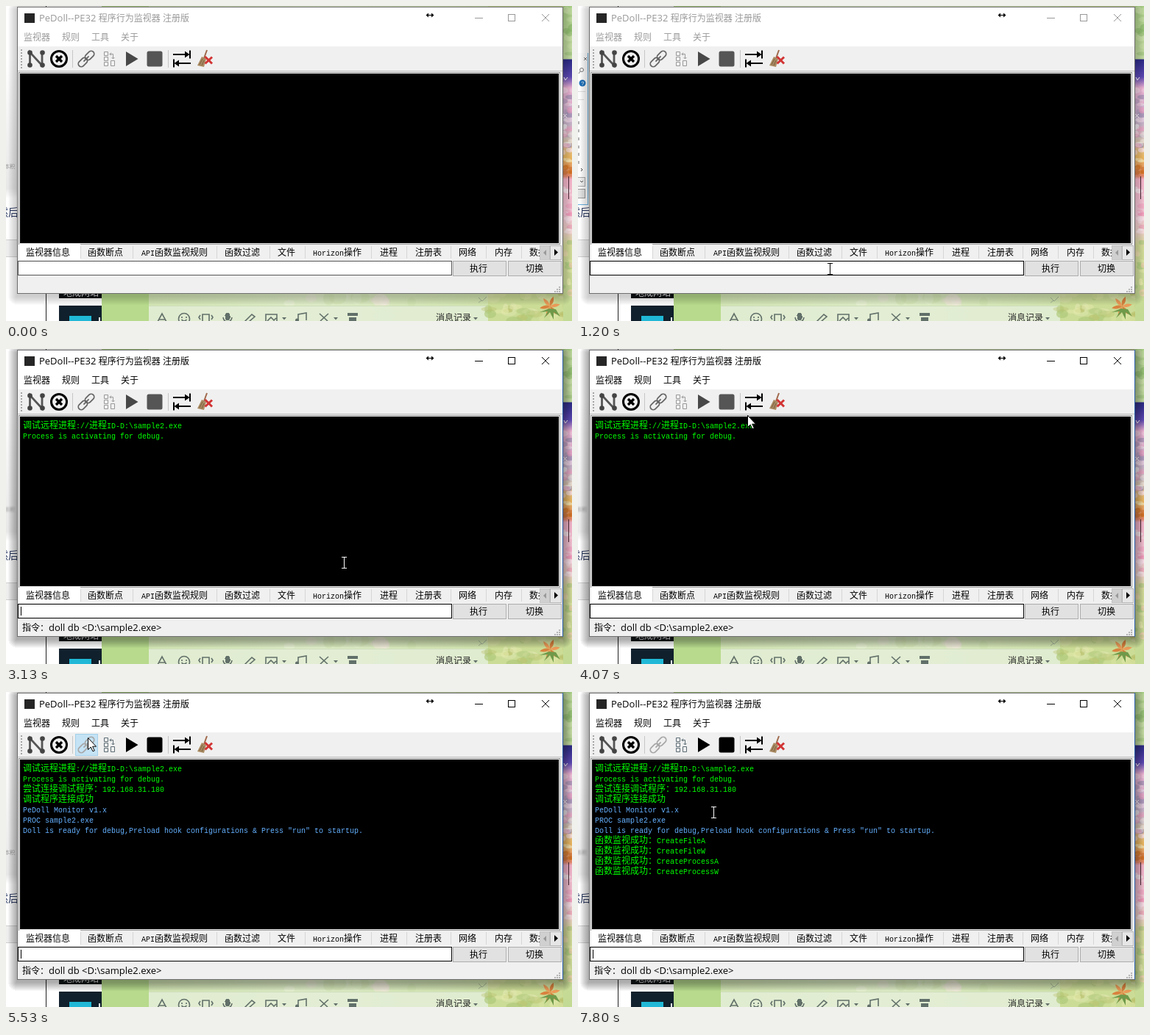
Write an HTML page that moves like this. It is 769x429 px and loops after 8 s.

```html
<!DOCTYPE html>
<html lang="zh">
<head>
<meta charset="utf-8">
<title>Monitor</title>
<style>
html, body { margin: 0; width: 100%; height: 100%; overflow: hidden; background: #fff; }
svg { display: block; width: 769px; height: 429px; }
text { font: 12px "Noto Sans CJK SC", "Noto Sans CJK", sans-serif; white-space: pre; }
.mono { font: 10px "Liberation Mono", monospace; }
.ui { font: 13px "Open Sans", "Noto Sans", sans-serif; }
rect, .crisp { shape-rendering: crispEdges; }
.beam { mix-blend-mode: difference; }
</style>
</head>
<body>
<svg id="stage" width="769" height="429" viewBox="0 0 769 429">
  <defs>
    <linearGradient id="strip" x2="0" y2="1">
      <stop offset="0" stop-color="#a9cf86"/><stop offset=".168" stop-color="#c3dba2"/>
      <stop offset=".17" stop-color="#2b2a86"/><stop offset=".225" stop-color="#5d49b4"/>
      <stop offset=".26" stop-color="#eeb4d4"/><stop offset=".36" stop-color="#c6b0cf"/>
      <stop offset=".42" stop-color="#d9c8c0"/><stop offset=".48" stop-color="#eebb62"/>
      <stop offset=".54" stop-color="#e98a6a"/><stop offset=".55" stop-color="#f6b5cb"/>
      <stop offset=".66" stop-color="#f5c9d8"/><stop offset=".72" stop-color="#ecd0c4"/>
      <stop offset=".76" stop-color="#d5dd9a"/><stop offset="1" stop-color="#c2da94"/>
    </linearGradient>
    <linearGradient id="chat"><stop stop-color="#d3e6b4"/><stop offset=".5" stop-color="#dfedc8"/><stop offset="1" stop-color="#d2e5ae"/></linearGradient>
    <linearGradient id="fade" x2="0" y2="1"><stop stop-color="#fff"/><stop offset=".93" stop-color="#e8e8e8"/><stop offset="1" stop-color="#fff"/></linearGradient>
  </defs>
  <g id="back"></g>
  <g id="panel"></g>
  <g id="shadow"></g>
  <g id="win"></g>
  <g id="tools" fill="none">
    <g stroke="#555" stroke-width="2.800"><path d="M32.500 81V63L49 81V63"/>
      <g fill="#444" stroke="none"><circle cx="32.500" cy="63.500" r="3.300"/><circle cx="32.500" cy="80.500" r="3.300"/><circle cx="49.500" cy="63.500" r="3.300"/><circle cx="49.500" cy="80.500" r="3.300"/></g></g>
    <g stroke="#000" stroke-width="3"><circle cx="72" cy="72" r="10.500"/><path d="M68 68l8 8m0-8l-8 8" stroke-width="3.400"/></g>
    <g id="link" stroke-width="1.800" transform="rotate(-45 109 72)"><rect x="95.500" y="68" width="14" height="8" rx="4" style="shape-rendering:auto"/><rect x="108.500" y="68" width="14" height="8" rx="4" style="shape-rendering:auto"/><path d="M104 72h10"/></g>
    <path id="tree" d="M133.500 62.500h5v5h-5zM133.500 69.500h5v5h-5zM133.500 76.500h5v5h-5zM142.500 74.500h5v7h-5zM141 65.500h4.500v6M143.500 70l2 2 2-2M143 63.500l-2 2 2 2"/>
    <path id="play" d="M163 62L179.500 72 163 82Z"/>
    <rect id="stop" x="191.500" y="61.500" width="21" height="21" rx="2.500" style="shape-rendering:auto"/>
    <g stroke="#000" stroke-width="2"><path d="M227 66h18M250 60.500v11M251 78h-18M228 72.500v11"/><path d="M243 61.500l6.500 4.500-6.500 4.500zM235 73.500l-6.500 4.500 6.500 4.500z" fill="#000" stroke="none"/></g>
    <path d="M273 60l-4 11" stroke="#a06a4c" stroke-width="2"/>
    <path d="M266 69l6 3-3 11-9-2z" fill="#a98a62"/><path d="M263 80l4-8m-1 9l3-7" stroke="#7a603f"/>
    <path d="M270.500 69l9.500 9.500m0-9l-9.500 9" stroke="#d23434" stroke-width="3"/>
  </g>
  <g id="log"></g>
  <g id="live"></g>
  <g id="arrow"><path d="M.5 .5V16.500L4.200 13 7 18.800 9.300 17.800 6.600 12.200H11.500Z" fill="#fff" stroke="#000"/></g>
  <g id="beam" class="beam"><path class="crisp" fill="#fff" d="M-3 -8h7v1h-7zM0 -7h1v14h-1zM-3 7h7v1h-7z"/></g>
</svg>
<script>
const $ = id => document.getElementById(id);
const LOOP = 8000;

function add(parent, tag, attrs) {
  const e = document.createElementNS('http://www.w3.org/2000/svg', tag);
  for (const k in attrs) e.setAttribute(k, attrs[k]);
  return parent.appendChild(e);
}
const box = (p, x, y, width, height, fill, more) => add(p, 'rect', { x, y, width, height, fill, ...more });
const line = (p, d, stroke, more) => add(p, 'path', { d, stroke, fill: 'none', ...more });
const frame = (p, x, y, w, h, fill, stroke) => box(p, x + .5, y + .5, w - 1, h - 1, fill, { stroke });

// Latin runs get their own face, the rest stays in the CJK face
function label(p, x, y, str, fill, latin = 'mono') {
  const t = add(p, 'text', { x, y, fill });
  for (const run of str.match(/[\x00-\x7f]+|[^\x00-\x7f]+/g))
    add(t, 'tspan', run.charCodeAt(0) < 128 ? { class: latin } : {}).textContent = run;
  return t;
}

let seed = 7;
const rnd = () => (seed = seed * 16807 % 2147483647) / 2147483647;
function blobs(p, n, x, y, w, h, r, colors) {
  for (let i = 0; i < n; i++)
    add(p, 'ellipse', {
      cx: x + rnd() * w, cy: y + rnd() * h, rx: r * (.4 + rnd()), ry: r * (.3 + rnd() * .6),
      fill: colors[i % colors.length], opacity: .3 + rnd() * .4
    });
}

function drawBack() {
  const g = $('back');
  box(g, 0, 0, 769, 429, '#fff');
  box(g, 130, 0, 64, 429, '#b7da8c');
  box(g, 194, 0, 461, 429, 'url(#chat)');
  blobs(g, 12, 385, 392, 180, 14, 11, ['#eaf2d8', '#cfe3ae', '#efe9da']);
  box(g, 194, 408, 461, 21, '#e4eed8', { opacity: .8 });
  line(g, 'M194 408.500H655', '#cddcb8');
  box(g, 655, 0, 114, 429, '#cbdc96');
  blobs(g, 40, 655, 388, 114, 41, 8, ['#dfe6a6', '#adc878', '#e4e8b4', '#b9bf6a']);
  box(g, 757, 0, 12, 429, 'url(#strip)');
  blobs(g, 9, 757, 0, 12, 68, 6, ['#cfe3ae', '#8dbb6c']);
  blobs(g, 30, 757, 115, 12, 85, 5, ['#fff', '#f0a0c4', '#ffe6f0', '#9d8fb4']);
  blobs(g, 12, 757, 203, 12, 28, 4, ['#e07f28', '#fff1c0', '#c8641c']);
  blobs(g, 14, 757, 238, 12, 70, 5, ['#fff', '#f58bb4', '#ffe6f0']);
  blobs(g, 14, 757, 315, 12, 80, 6, ['#eef0b4', '#a8cd7c', '#f5cfb4']);
  line(g, 'M758 97l2 4 3-4M757 147l5 5m0-5l-5 5', '#fff');
  line(g, 'M764.500 232V263', '#4c2a38');
  // lily
  for (let i = 0; i < 6; i++)
    add(g, 'path', { d: 'M0 0C3 -5 3 -9 0 -14C-3 -9 -3 -5 0 0', fill: i % 2 ? '#eb9a58' : '#d9823f', transform: `translate(739 409) rotate(${i * 60 + 20})` });
  add(g, 'path', { d: 'M738 412l-13 5 11-1-5 9 8-8 5 10 0-10 9 6-6-10z', fill: '#6f9a4a' });
  // page on the left
  line(g, 'M54.500 0V429', '#222', { class: 'crisp' });
  box(g, 72, 385, 58, 13, '#0c0f12');
  label(g, 78, 395, '地成网站', '#ddd');
  box(g, 72, 408, 58, 21, '#10202c');
  box(g, 86, 422, 30, 7, '#20b8d6');
  box(g, 126, 424, 1.500, 5, '#fff');
  box(g, 0, 70, 15, 192, 'url(#fade)');
  box(g, 0, 318, 15, 24, '#eee');
  line(g, 'M0 318.500H15M0 341.500H15', '#cfcfcf', { class: 'crisp' });
  label(g, -11, 286, '然后', '#26355f').style.fontSize = '14px';
  // chat tool row
  const s = { 'stroke-width': 1.600 };
  line(g, 'M206 430l6-11 6 11M208 427h8', '#62706a', s);
  add(g, 'circle', { cx: 242, cy: 426, r: 7.500, stroke: '#62706a', fill: 'none', ...s });
  line(g, 'M239 423v2M245 423v2M238.500 427q3.500 4 7 0', '#62706a', s);
  line(g, 'M267 430v-10h9v10M264 421l-2 3 2 3M279 421l2 3-2 3', '#62706a', s);
  box(g, 297.500, 418, 7, 10, '#62706a', { rx: 3.500 });
  line(g, 'M295 424q1 6 6 6t6-6', '#62706a', s);
  line(g, 'M324 430l10-10 4 3-8 7', '#62706a', s);
  line(g, 'M353 430v-10h15v10M355 429l5-5 4 4 3-3M397 428v-8l11-2v10', '#62706a', s);
  add(g, 'circle', { cx: 395.500, cy: 428, r: 2.500, fill: '#62706a' });
  line(g, 'M426 419l11 10M438 419l-11 10', '#62706a', s);
  box(g, 464, 418, 14, 4, '#62706a');
  box(g, 466, 424, 10, 5, '#62706a');
  for (const x of [378, 448, 638])
    add(g, 'path', { d: `M${x - 3} 424h6l-3 3.500z`, fill: '#62706a' });
  label(g, 584, 429, '消息记录', '#222');
  line(g, 'M642 397l5 5 6-6M642 404l4-3', '#a3b294');
}

function drawPanel() {
  const g = $('panel');
  box(g, 0, 64, 13, 206, '#fcfcfc');
  line(g, 'M13.500 64V270.500H0', '#67aede', { class: 'crisp' });
  line(g, 'M0 116.500H10M0 127.500H8', '#ddd', { class: 'crisp' });
  line(g, 'M8 70l4 4m0-4l-4 4', '#777');
  add(g, 'circle', { cx: 5, cy: 87, r: 2.500, fill: 'none', stroke: '#777' });
  line(g, 'M3 89l-2 3', '#777');
  add(g, 'circle', { cx: 6, cy: 105, r: 4.500, fill: '#1d6fb8' });
  const q = label(g, 4, 108, '?', '#fff');
  q.firstChild.setAttribute('style', 'font-size:8px');
  for (let i = 0; i < 8; i++) box(g, 0, 135 + i * 10.900, 2, 4, '#b5b5b5');
  line(g, 'M4 221l2 2-2 2', '#444');
  frame(g, -2, 233, 12, 13, '#eee', '#aaa');
  line(g, 'M3 238l2 2 2-2', '#555');
  frame(g, -2, 249, 12, 13, '#e1e1e1', '#999');
}

function drawShadow() {
  for (let i = 1; i <= 12; i++)
    box($('shadow'), 15 - i, 6 - i, 742 + 2 * i, 389 + 2 * i, '#000', { rx: i, opacity: .03 });
}

const ui = {};
function drawWindow() {
  const g = $('win');
  frame(g, 15, 1, 742, 391, '#f0f0f0', '#6e6e6e');
  box(g, 16, 2, 740, 53, '#fff');
  ui.edge = box(g, 756, 1, 1, 391, '#2f62ad');
  box(g, 25, 10, 14, 13, '#262626');
  ui.head = add(g, 'g', {});
  label(ui.head, 45, 21, 'PeDoll--PE32 程序行为监视器 注册版', 'currentColor', 'ui');
  ['监视器', '规则', '工具', '关于'].forEach((s, i) => label(ui.head, [24, 76, 116, 156][i], 47, s, 'currentColor'));
  line(ui.head, 'M637 16.500H648M682.500 11.500h9v9h-9z', 'currentColor', { class: 'crisp' });
  line(ui.head, 'M728 11l10 10m0-10l-10 10', 'currentColor');
  // resize pointer left on the title bar
  line(g, 'M573 12.500h6', '#000');
  add(g, 'path', { d: 'M570.500 12.500l3.500-3v6zM581.500 12.500l-3.500-3v6z' });
  // toolbar
  line(g, 'M16 88.500H756', '#c4c4c4', { class: 'crisp' });
  line(g, 'M21 59V86', '#a5a5a5', { 'stroke-width': 2, 'stroke-dasharray': '2 2' });
  line(g, 'M90.500 60V84M220.500 60V84', '#c6c6c6', { class: 'crisp' });
  ui.hover = frame(g, 94, 57, 31, 30, '#c4e3f5', '#a4d0ea');
  // console
  frame(g, 17, 90, 736, 235, '#000', '#9a9a9a');
  frame(g, 18, 91, 734, 233, '#000', '#ececec');
  // tabs
  box(g, 17, 325, 736, 21, '#f0f0f0');
  box(g, 18, 324, 83, 22, '#fff');
  for (const x of [101, 172, 286, 358, 406, 496, 544, 604, 652, 700]) box(g, x, 327, 1, 17, '#d6d6d6');
  const tabs = { 27: '监视器信息', 111: '函数断点', 184: 'API函数监视规则', 297: '函数过滤', 369: '文件',
    417: 'Horizon操作', 508: '进程', 556: '注册表', 615: '网络', 664: '内存', 711: '数据' };
  for (const x in tabs) label(g, x, 340, tabs[x], '#000');
  frame(g, 725, 326, 14, 20, '#d0d0d0', '#c4c4c4');
  frame(g, 739, 326, 16, 20, '#e6e6e6', '#b5b5b5');
  add(g, 'path', { d: 'M734 332v8l-4-4z', fill: '#999' });
  add(g, 'path', { d: 'M745 331v9l5-4.500z' });
  // command row
  ui.field = frame(g, 16, 347, 590, 20, '#fff', '#555');
  frame(g, 607, 347, 73, 21, '#e1e1e1', '#adadad');
  frame(g, 682, 347, 73, 21, '#e1e1e1', '#adadad');
  label(g, 630, 362, '执行', '#000');
  label(g, 706, 362, '切换', '#000');
  for (let i = 0; i < 3; i++)
    for (let j = 0; j <= i; j++) box(g, 751 - j * 3, 382 + i * 3, 2, 2, '#b4b4b4');
  const live = $('live');
  ui.cmd = label(live, 21, 360, 'doll db <D:\\sample2.exe>', '#000');
  ui.status = label(live, 22, 384, '指令：doll db <D:\\sample2.exe>', '#000', 'ui');
  ui.caret = box(live, 20, 351, 1, 12, '#000');
  ui.row = box($('panel'), 0, 144, 3, 9, '#a9d8bd');
  ui.dim = label($('back'), -2, 221, '本积', '#9a9a9a');
  ui.dim.style.fontSize = '7px';
}

const GREEN = '#00ff00', BLUE = '#64b0ff';
const lines = [
  [3000, GREEN, '调试远程进程://进程ID-D:\\sample2.exe'],
  [3070, GREEN, 'Process is activating for debug.'],
  [5130, GREEN, '尝试连接调试程序：192.168.31.180'],
  [5400, GREEN, '调试程序连接成功'],
  [5470, BLUE, 'PeDoll Monitor v1.x'],
  [5470, BLUE, 'PROC sample2.exe'],
  [5530, BLUE, 'Doll is ready for debug,Preload hook configurations & Press "run" to startup.'],
  ...['FileA', 'FileW', 'ProcessA', 'ProcessW'].map((s, i) => [7330 + (i > 1) * 70, GREEN, '函数监视成功：Create' + s])
].map(([at, color, str], i) => ({ at, node: label($('log'), 23, 108 + i * 14, str, color) }));

const smooth = u => u * u * (3 - 2 * u);
const speedUp = u => u ** 1.500;
const slowDown = u => 1 - (1 - u) ** 1.600;
// time, x, y, easing towards this point
const path = [
  [470, 255, 440], [1200, 342, 358, slowDown], [1400, 342, 358], [1930, 459, 291, smooth],
  [3670, 459, 291], [4070, 230, 90, speedUp], [4470, 124, 64, slowDown], [4730, 110, 62, slowDown],
  [5500, 110, 62], [5870, 146, 68, smooth], [6900, 146, 68], [7130, 184, 164, smooth]
];
function pointer(t) {
  const i = path.findIndex(k => k[0] > t);
  if (i === 0) return [path[0][1], path[0][2]];
  if (i < 0) return path[path.length - 1].slice(1, 3);
  const a = path[i - 1], b = path[i];
  const u = (b[3] || smooth)((t - a[0]) / (b[0] - a[0]));
  return [1, 2].map(n => Math.round(a[n] + (b[n] - a[n]) * u));
}

const blinks = [[1470, 1930], [2470, 2930], [2930, 3530], [4130, 4600], [5070, 6130], [6670, 7330], [7800, LOOP]];
const within = (t, a, b) => t >= a && t < b;
const show = (e, on) => e.setAttribute('visibility', on ? 'visible' : 'hidden');
const set = (e, k, v) => e.setAttribute(k, v);

function render(t) {
  const active = t >= 1470, linked = t >= 5470;
  set(ui.head, 'color', active ? '#000' : '#999');
  show(ui.edge, active);
  set($('shadow'), 'opacity', active ? 1 : .6);
  set(ui.field, 'stroke', t >= 1070 ? '#000' : '#555');

  const panel = within(t, 800, 3130);
  $('panel').style.display = panel ? '' : 'none';
  show(ui.row, within(t, 1930, 2470));
  show(ui.dim, !panel);
  ui.dim.style.filter = within(t, 3130, 4470) || t >= 6130 ? 'blur(1px)' : 'none';

  const onTree = within(t, 5670, 7330);
  show(ui.hover, within(t, 4530, 5600) || onTree);
  set(ui.hover, 'x', onTree ? 125.500 : 94.500);
  set(ui.hover, 'fill', onTree && t >= 6670 ? '#a6d3ee' : '#c4e3f5');
  set($('link'), 'stroke', linked ? '#a8a8a8' : '#666');
  set($('tree'), 'stroke', linked ? (onTree ? '#3f86ae' : '#5a6a72') : '#999');
  set($('play'), 'fill', linked ? '#000' : '#484848');
  set($('stop'), 'fill', linked ? '#000' : '#555');

  for (const l of lines) show(l.node, t >= l.at);
  const typed = within(t, 2330, 2930);
  show(ui.cmd, typed);
  show(ui.status, t >= 2930);
  show(ui.caret, blinks.some(b => within(t, ...b)));
  set(ui.caret, 'x', typed ? 164 : 20);

  const [x, y] = pointer(t);
  const overText = (within(y, 92, 323) || within(y, 347, 368)) && !within(t, 6900, 7330);
  const seen = t >= 470;
  show($('arrow'), seen && !overText);
  show($('beam'), seen && overText);
  for (const id of ['arrow', 'beam']) set($(id), 'transform', `translate(${x} ${y})`);
}

drawBack();
drawPanel();
drawShadow();
drawWindow();

const start = performance.now();
function tick(now) {
  render(Math.max(0, now - start) % LOOP);
  requestAnimationFrame(tick);
}
render(0);
requestAnimationFrame(tick);
</script>
</body>
</html>
```
